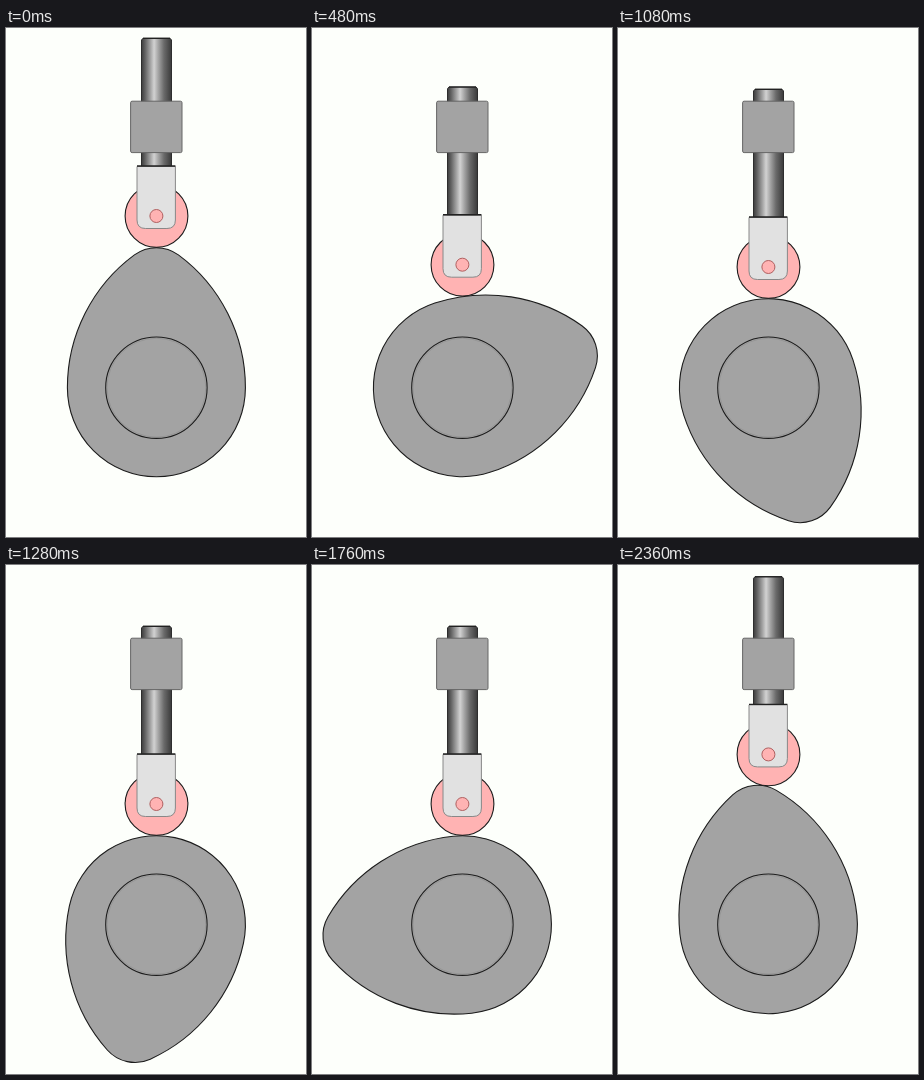
Recreate the animation shown at these times as an HTML page. Size 300x509 px, loop 2.4 s.

```html
<!DOCTYPE html>
<html lang="en">
<head>
<meta charset="utf-8">
<title>Cam and roller follower</title>
<style>
  html, body { margin: 0; width: 100%; height: 100%; overflow: hidden; background: #fdfffb; }
  svg { display: block; width: 300px; height: 509px; }
  .edge { stroke: #1c1c1c; stroke-width: 1.1; }
  .steel { fill: #a3a3a3; }
  .pink { fill: #ffb3b3; }
</style>
</head>
<body>
<svg viewBox="0 0 300 509">
  <defs>
    <linearGradient id="rod">
      <stop offset="0" stop-color="#3c3c3c"/>
      <stop offset=".12" stop-color="#626262"/>
      <stop offset=".3" stop-color="#a4a4a4"/>
      <stop offset=".42" stop-color="#d2d2d2"/>
      <stop offset=".55" stop-color="#a8a8a8"/>
      <stop offset=".75" stop-color="#6a6a6a"/>
      <stop offset="1" stop-color="#3a3a3a"/>
    </linearGradient>
  </defs>

  <g class="follower">
    <path d="M135.5 139V12l1.5-1.8h27l1.5 1.8v127z" fill="url(#rod)" stroke="#222" stroke-width=".9"/>
    <path d="M137 10.4h27" stroke="#222" stroke-width="1.2"/>
  </g>

  <rect class="steel" x="124.6" y="73.2" width="51.4" height="51.4" rx="1.5" stroke="#666" stroke-width="1"/>

  <g class="follower">
    <circle class="pink edge" cx="150.5" cy="188" r="31.4"/>
    <path d="M131 138.5h38.4V192q0 8.5-8.5 8.5h-21.4q-8.5 0-8.5-8.5z" fill="#e1e1e1" stroke="#888" stroke-width="1"/>
    <path d="M131 138h38.4" stroke="#222" stroke-width="1.4"/>
    <circle class="pink" cx="150.4" cy="188" r="6.5" stroke="#b06060" stroke-width="1"/>
  </g>

  <g transform="translate(150.4 359.7)">
    <path id="cam" class="steel edge"/>
    <circle class="steel edge" r="50.7"/>
    <circle r="49.4" fill="none" stroke="#888" stroke-width=".5"/>
  </g>
</svg>
<script>
  const LOOP = 2400, STEP = 40;
  const BASE = 89, NOSE = 37, NOSE_Y = 103, ROLLER = 31.5;
  const GAP = BASE - NOSE;
  const FLANK_X = (NOSE_Y ** 2 - GAP ** 2) / (2 * GAP);
  const FLANK = BASE + FLANK_X;
  const PEAK = NOSE_Y + NOSE + ROLLER;

  const cam = document.getElementById('cam');
  const followers = document.querySelectorAll('.follower');

  // Base circle, two flanks and a nose, all tangent arcs
  const span = Math.hypot(FLANK_X, NOSE_Y);
  const joinX = NOSE * FLANK_X / span;
  const joinY = -NOSE_Y * (1 + NOSE / span);
  const arc = (r, x, y) => `A${r} ${r} 0 0 1 ${x} ${y}`;
  cam.setAttribute('d', `M${-BASE} 0` + arc(FLANK, -joinX, joinY) + arc(NOSE, joinX, joinY) +
    arc(FLANK, BASE, 0) + arc(BASE, -BASE, 0) + 'z');

  // Far crossing of a ray from the origin with a circle
  const reach = (along, across, r) => along + Math.sqrt(r * r - across * across);

  // Distance from cam axis to roller axis, at an angle from the nose
  function pitch(angle) {
    const c = Math.cos(angle), s = Math.abs(Math.sin(angle));
    if (c <= 0) return BASE + ROLLER;
    const r = NOSE + ROLLER;
    const edge = Math.atan2(r * FLANK_X / span, NOSE_Y * (1 + r / span));
    return Math.atan2(s, c) < edge
      ? reach(NOSE_Y * c, NOSE_Y * s, r)
      : reach(-FLANK_X * s, FLANK_X * c, FLANK + ROLLER);
  }

  function draw(now) {
    const turn = Math.floor(now % LOOP / STEP) * STEP / LOOP;
    const drop = PEAK - pitch(turn * 2 * Math.PI);
    cam.setAttribute('transform', `rotate(${turn * 360})`);
    for (const f of followers) f.setAttribute('transform', `translate(0 ${drop.toFixed(2)})`);
  }

  const start = performance.now();
  function tick() {
    draw(performance.now() - start);
    requestAnimationFrame(tick);
  }
  tick();
</script>
</body>
</html>
```
